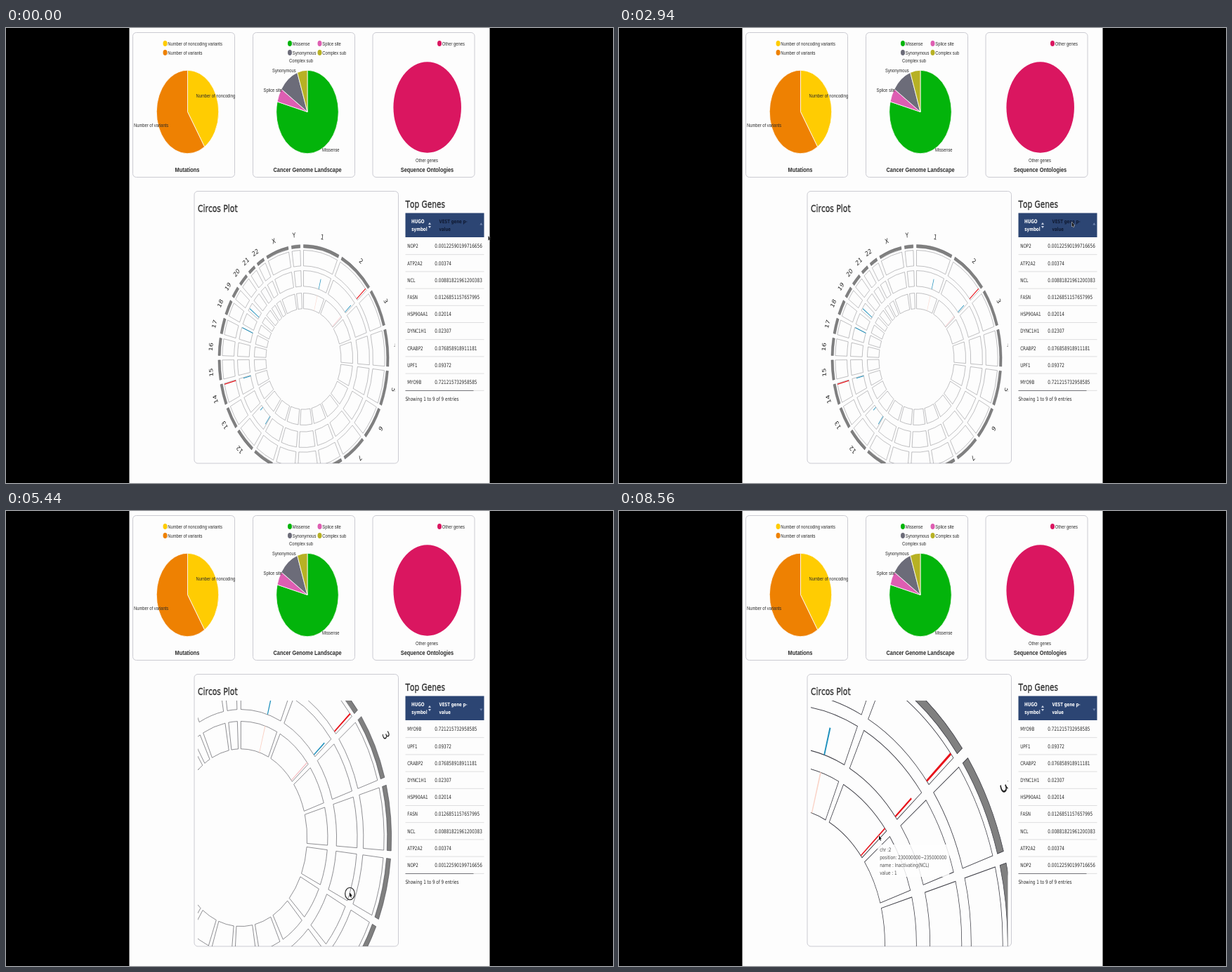
Animation, 864 px wide and 648 px high, one loop 8.58 s. Source, as an HTML page with a canvas:

```html
<!DOCTYPE html>
<html lang="en">
<head>
<meta charset="utf-8">
<title>Genome dashboard</title>
<style>
html, body { margin: 0; width: 100%; height: 100%; overflow: hidden; background: #000; }
canvas { display: block; }
</style>
</head>
<body>
<canvas id="stage" width="864" height="648"></canvas>
<script>
const ctx = document.getElementById('stage').getContext('2d');
const LOOP = 8580, SQUEEZE = 0.746, TAU = Math.PI * 2;
const ARIAL = '"Liberation Sans", Arial, sans-serif';
const HUMANIST = '"DejaVu Sans", sans-serif';

const GENES = [
  ['NOP2', '0.00122590199716656'], ['ATP2A2', '0.00374'],
  ['NCL', '0.00881821961200383'], ['FASN', '0.0126851157657995'],
  ['HSP90AA1', '0.02014'], ['DYNC1H1', '0.02307'],
  ['CRABP2', '0.076858918911181'], ['UPF1', '0.09372'],
  ['MYO9B', '0.721215732958585']
];

// Chromosome lengths in Mb
const LENGTHS = [249.25, 243.2, 198.02, 191.15, 180.92, 171.12, 159.14, 146.36,
  141.21, 135.53, 135.01, 133.85, 115.17, 107.35, 102.53, 90.35, 81.2, 78.08,
  59.13, 63.03, 48.13, 51.3, 155.27, 59.37];
const GAP = 0.04;
const PER_MB = (TAU - GAP * LENGTHS.length) / LENGTHS.reduce((a, b) => a + b);
let angle = 0;
const CHROMS = LENGTHS.map((len, i) => {
  const c = { name: i < 22 ? String(i + 1) : 'XY'[i - 22], a: angle, b: angle + len * PER_MB };
  angle = c.b + GAP;
  return c;
});

const RINGS = [[71.7, 94], [103.6, 126], [132.7, 155]];
const RED = '#e8131b', BLUE = '#2091bd';
// chromosome, Mb, inner radius, outer radius, colour, time it turns red
const BARS = [
  [2, 232.5, 132.7, 155, RED], [14, 102.5, 132.7, 155, RED],
  [2, 232.5, 103.6, 118.5, BLUE, 7300], [1, 164.3, 103.6, 118.5, BLUE],
  [14, 102.5, 103.6, 118, BLUE], [12, 7.5, 103.6, 118, BLUE], [12, 112.5, 103.6, 110, BLUE],
  [17, 80.5, 103.6, 125, BLUE], [19, 17.5, 103.6, 125, BLUE],
  [2, 232.5, 71.7, 94, '#f8bcc0', 8150], [1, 165, 71.7, 94, '#fad2c6']
];

// time, x, y
const POINTER = [
  [0, 686.5, 296], [400, 686.5, 296], [1900, 451, 137], [2400, 451, 137],
  [3000, 650, 280], [3350, 650, 280], [3600, 646, 365], [3720, 646, 365],
  [4500, 446, 436], [4900, 446, 436], [5250, 489, 543], [5440, 489, 543],
  [5900, 457, 624], [6150, 457, 624], [6350, 428, 410], [7050, 428, 410],
  [7300, 412, 415], [7800, 412, 415], [8200, 370, 462], [LOOP, 370, 462]
];
// time, centre x, centre y, zoom
const VIEW = [
  [0, 423.5, 471.5, 1], [4600, 423.5, 471.5, 1], [4750, 425.3, 473.3, 0.985],
  [4850, 425.3, 473.3, 0.985], [5300, 334.3, 465.2, 1.763], [5440, 334.3, 465.2, 1.763],
  [5900, 301, 546, 1.763], [6100, 301, 546, 1.763], [6700, 234, 616, 2.7],
  [LOOP, 234, 616, 2.7]
];
const SORT_AT = 3250;

const mix = (a, b, u) => a + (b - a) * u;

function span(keys, t) {
  let i = 0;
  while (i < keys.length - 2 && t >= keys[i + 1][0]) i++;
  const p = keys[i], q = keys[i + 1];
  const u = Math.min(1, (t - p[0]) / (q[0] - p[0]));
  return [p, q, u * u * (3 - 2 * u)];
}

function pointerAt(t) {
  const [p, q, u] = span(POINTER, t);
  return { x: mix(p[1], q[1], u), y: mix(p[2], q[2], u) };
}

function viewAt(t) {
  const [p, q, u] = span(VIEW, t);
  const zoom = p[3] * Math.pow(q[3] / p[3], u);
  const w = p[3] === q[3] ? u : (zoom - p[3]) / (q[3] - p[3]);
  return { x: mix(p[1], q[1], w), y: mix(p[2], q[2], w), zoom };
}

// The whole page is squeezed horizontally, so text shares one factor
function text(str, x, y, size, opt = {}) {
  ctx.save();
  ctx.translate(x, y);
  ctx.scale(SQUEEZE, 1);
  ctx.font = (opt.bold ? 'bold ' : '') + size + 'px ' + (opt.font || ARIAL);
  ctx.fontKerning = 'none';
  ctx.textAlign = opt.align || 'left';
  ctx.fillStyle = opt.color || '#2a2a2a';
  ctx.fillText(str, 0, 0);
  if (opt.heavy) {
    ctx.strokeStyle = ctx.fillStyle;
    ctx.lineWidth = opt.heavy;
    ctx.strokeText(str, 0, 0);
  }
  ctx.restore();
}

function card(x, y, w, h) {
  ctx.beginPath();
  ctx.roundRect(x, y, w, h, 5);
  ctx.strokeStyle = '#cbcbd2';
  ctx.lineWidth = 1;
  ctx.stroke();
}

function box(x, y, w, h, fill, stroke) {
  ctx.fillStyle = fill;
  ctx.fillRect(x, y, w, h);
  if (!stroke) return;
  ctx.strokeStyle = stroke;
  ctx.lineWidth = 1;
  ctx.strokeRect(x, y, w, h);
}

function dot(x, y, r, color) {
  ctx.beginPath();
  ctx.ellipse(x, y, r * SQUEEZE, r, 0, 0, TAU);
  ctx.fillStyle = color;
  ctx.fill();
}

function legend(x, y, color, label) {
  dot(x, y, 4, color);
  text(label, x + 3.8, y + 3, 7.8);
}

function pie(x, y, r, parts) {
  const total = parts.reduce((sum, p) => sum + p[0], 0);
  let a = -TAU / 4;
  ctx.save();
  ctx.translate(x, y);
  ctx.scale(SQUEEZE, 1);
  ctx.strokeStyle = '#fff';
  ctx.lineWidth = 0.9;
  for (const [value, color] of parts) {
    const b = a + value / total * TAU;
    ctx.beginPath();
    ctx.moveTo(0, 0);
    ctx.arc(0, 0, r, a, b);
    ctx.closePath();
    ctx.fillStyle = color;
    ctx.fill();
    ctx.stroke();
    a = b;
  }
  ctx.restore();
}

function charts(p) {
  [180.5, 351.5, 522].forEach(x => card(x, 6.5, 145, 206));
  const title = (s, x) => text(s, x, 205, 9.9, { bold: true, align: 'center' });

  const yellow = '#ffcc02', orange = '#ee8102';
  legend(226.5, 22, yellow, 'Number of noncoding variants');
  legend(226.5, 35, orange, 'Number of variants');
  pie(258.5, 119.5, 59.3, [[147, yellow], [213, orange]]);
  ctx.save();
  ctx.beginPath();
  ctx.rect(180, 6, 146, 206);
  ctx.clip();
  text('Number of noncoding variants', 270.5, 99, 7.8);
  ctx.restore();
  text('Number of variants', 182, 140.5, 7.8);
  title('Mutations', 258);

  const green = '#03b40b', pink = '#de5eb2', gray = '#6c6c79', olive = '#b7b124';
  const hover = Math.hypot((p.x - 429) / 44, (p.y - 119.5) / 59) < 1;
  legend(404, 22, green, 'Missense');
  legend(446.5, 22, pink, 'Splice site');
  legend(404, 35, gray, 'Synonymous');
  legend(446.5, 35, olive, 'Complex sub');
  pie(429, 119.5, 59.3, [[15, hover ? '#5ac85b' : green], [1, pink], [2, gray], [1, olive]]);
  text('Complex sub', 403, 48.5, 7.8);
  text('Synonymous', 379, 63, 7.8);
  text('Splice site', 366.5, 90.5, 7.8);
  text('Missense', 450, 176, 7.8);
  title('Cancer Genome Landscape', 429);

  legend(617, 22, '#da1660', 'Other genes');
  dot(599.7, 113, 64.7, '#da1660');
  text('Other genes', 583, 191, 7.8);
  title('Sequence Ontologies', 599.5);

  if (hover) pieTip(p.x - 37.5, p.y - 82.5);
}

function pieTip(x, y) {
  box(x, y, 52.5, 37.5, '#fff', '#d6d6d6');
  box(x, y, 52.5, 20.5, '#f7f7f7', '#e0e0e0');
  text('Missense', x + 26.2, y + 14, 11, { font: HUMANIST, align: 'center' });
  text('15.00', x + 26.2, y + 31.5, 7.9, { font: HUMANIST, align: 'center' });
}

function sector(a, b, r0, r1) {
  ctx.beginPath();
  ctx.arc(0, 0, r1, a - TAU / 4, b - TAU / 4);
  ctx.arc(0, 0, r0, b - TAU / 4, a - TAU / 4, true);
  ctx.closePath();
}

function circos(t) {
  card(268, 232.5, 290.5, 387.5);
  text('Circos Plot', 273, 262, 14.4, { font: HUMANIST, heavy: 0.3 });

  const v = viewAt(t);
  ctx.save();
  ctx.beginPath();
  ctx.rect(273, 270, 280.5, 350);
  ctx.clip();
  ctx.translate(v.x, v.y);
  ctx.scale(SQUEEZE * v.zoom, v.zoom);
  ctx.lineWidth = 0.38;
  ctx.strokeStyle = '#404048';
  for (const c of CHROMS) {
    sector(c.a, c.b, 158.5, 163);
    ctx.fillStyle = '#808080';
    ctx.fill();
    ctx.stroke();
    for (const [r0, r1] of RINGS) {
      sector(c.a, c.b, r0, r1);
      ctx.stroke();
    }
  }
  for (const [n, mb, r0, r1, color, turns] of BARS) {
    const a = CHROMS[n - 1].a + (mb - 2.5) * PER_MB;
    sector(a, a + 5 * PER_MB, r0, r1);
    ctx.fillStyle = turns && t >= turns ? RED : color;
    ctx.fill();
  }
  ctx.font = '9.7px ' + HUMANIST;
  ctx.textAlign = 'center';
  ctx.fillStyle = '#222';
  for (const c of CHROMS) {
    ctx.save();
    ctx.rotate((c.a + c.b) / 2 - 0.011);
    ctx.fillText(c.name, 0, -174);
    ctx.restore();
  }
  ctx.restore();
}

function arrow(x, y, dir, color) {
  ctx.beginPath();
  ctx.moveTo(x - 2, y);
  ctx.lineTo(x + 2, y);
  ctx.lineTo(x, y + 3.2 * dir);
  ctx.fillStyle = color;
  ctx.fill();
}

function table(t, p) {
  const sorted = t >= SORT_AT;
  const rows = sorted ? [...GENES].reverse() : GENES;
  const head = { font: HUMANIST, bold: true, color: '#fff' };
  const vest = { ...head, color: sorted ? '#fff' : '#101a33' };

  text('Top Genes', 568.5, 255.5, 14.2, { font: HUMANIST, heavy: 0.3 });
  box(568.5, 263.5, 112, 34.5, '#2c4573');
  text('HUGO', 577, 278, 7.5, head);
  text('symbol', 577.3, 289, 7.4, head);
  text('VEST gene p-', 616.5, 278, 7.2, vest);
  text('value', 616.5, 289, 7.2, vest);
  arrow(603, 280, -1, '#c5cde0');
  arrow(603, 282, 1, '#c5cde0');
  if (sorted) arrow(676.3, 281.5, 1, '#6f84ad');
  else arrow(676.3, 280.5, -1, '#6f84ad');

  rows.forEach(([gene, value], i) => {
    const top = 298.5 + 24.2 * i;
    box(568.5, top + 23.7, 112, 1, '#dededf');
    if (p.y >= top && p.y < top + 24.2 && p.x > 568 && p.x < 680.5) {
      const second = p.x > 607.5;
      const g = ctx.createLinearGradient(0, top, 0, top + 24);
      g.addColorStop(0, '#fdf58c');
      g.addColorStop(1, '#f3e03c');
      box(second ? 607.5 : 568.5, top, second ? 73 : 39, 24, g, '#b9ad58');
    }
    text(gene, 571.2, top + 14.8, 7.5, { font: HUMANIST });
    text(value, 610.3, top + 14.8, 7.7, { font: HUMANIST });
  });
  box(568.5, 516, 97, 1, '#77777c');
  text('Showing 1 to 9 of 9 entries', 568.5, 530.5, 7.55, { font: HUMANIST });
}

function barTip(p) {
  const x = p.x + 1.2, y = p.y + 23;
  box(x - 3, y - 10, 102, 46, 'rgba(255,255,255,0.82)');
  ['chr :2', 'position: 230000000~235000000', 'name : Inactivating(NCL)', 'value : 1']
    .forEach((s, i) => text(s, x, y + 11 * i, 7.55, { font: HUMANIST, color: '#4a4a4a' }));
}

function pointer(t, p) {
  if ((t >= 3200 && t < 3350) || (t >= 5400 && t < 5900)) {
    ctx.beginPath();
    ctx.ellipse(p.x + 0.5, p.y + 2, 6.8, 8.6, 0, 0, TAU);
    ctx.strokeStyle = '#333';
    ctx.lineWidth = 1.3;
    ctx.stroke();
  }
  const shape = [[0, 0], [0, 6.8], [1.2, 5.6], [2.1, 7.8], [3, 7.3], [2.2, 5.2], [3.8, 5.1]];
  ctx.beginPath();
  shape.forEach(([dx, dy]) => ctx.lineTo(p.x + dx, p.y + dy));
  ctx.closePath();
  ctx.strokeStyle = '#fff';
  ctx.lineWidth = 0.8;
  ctx.stroke();
  ctx.fillStyle = '#111';
  ctx.fill();
}

function draw(t) {
  const p = pointerAt(t);
  ctx.fillStyle = '#000';
  ctx.fillRect(0, 0, 864, 648);
  ctx.save();
  ctx.beginPath();
  ctx.rect(175.5, 0, 513, 648);
  ctx.clip();
  ctx.fillStyle = '#fdfdfd';
  ctx.fillRect(175, 0, 514, 648);
  circos(t);
  table(t, p);
  charts(p);
  if (t >= 8150) barTip(p);
  pointer(t, p);
  ctx.restore();
}

const start = performance.now();
function tick() {
  draw((performance.now() - start) % LOOP);
  requestAnimationFrame(tick);
}
tick();
</script>
</body>
</html>
```
